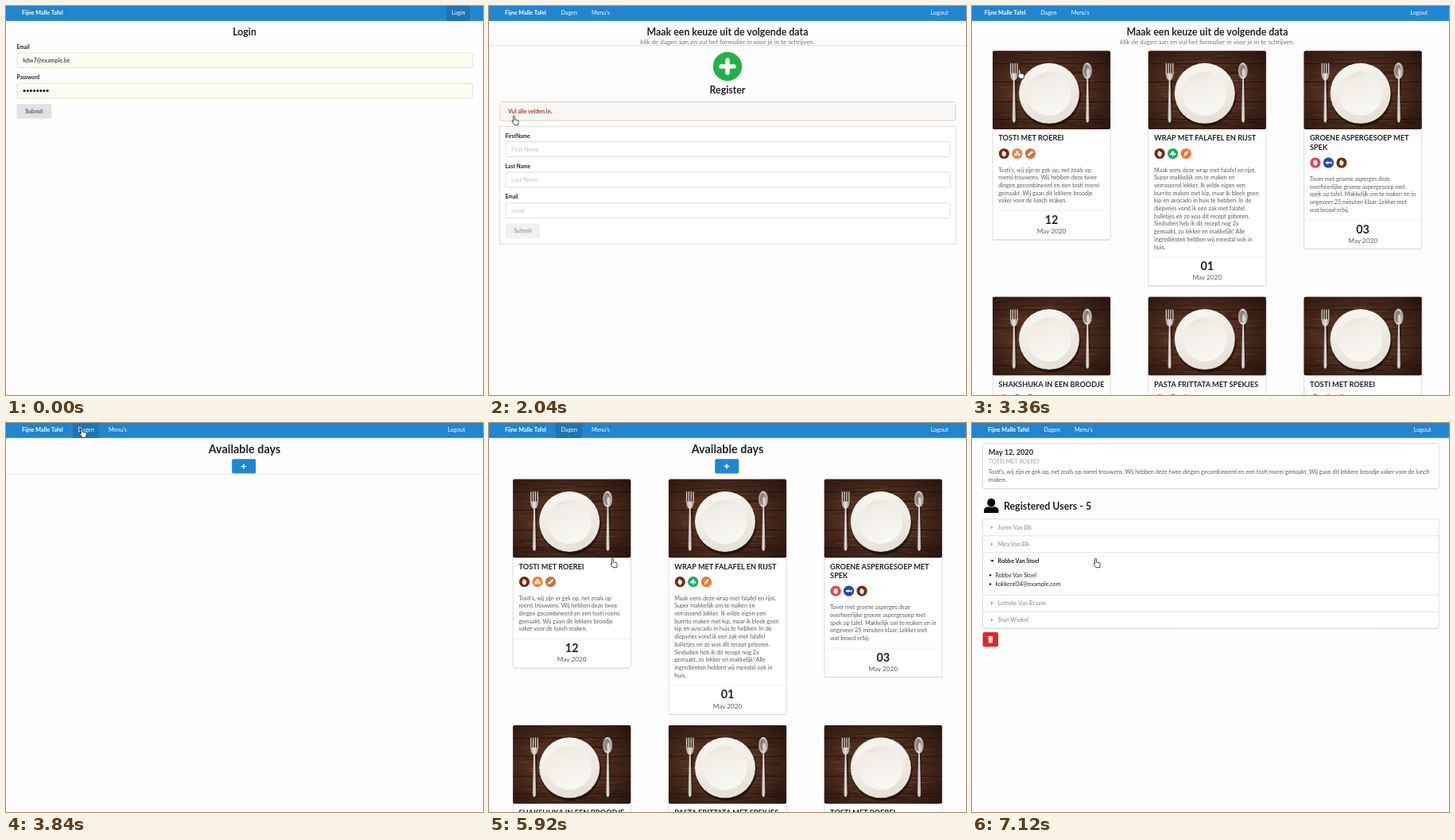
An HTML page that plays this animation: 600 px wide and 489 px high, repeating every 7.16 s.

```html
<!DOCTYPE html>
<html lang="nl">
<head>
<meta charset="utf-8">
<title>Lunch planner</title>
<style>
  html, body { margin: 0; width: 100%; height: 100%; overflow: hidden; background: #fefdfe; }
  svg { display: block; }
  text { font-family: Lato, sans-serif; fill: #222; white-space: pre; }
  .b { font-weight: 700; }
  .m { text-anchor: middle; }
  .w { fill: #fff; }
  .soft { fill: #777; }
  .body { fill: #5c5c5c; }
  .hint { fill: #c3c3c6; }
  .pale { fill: #a4a4a6; }
  .label { fill: #5f6062; }
  .warn { fill: #a83a2c; }
  .line { fill: none; stroke: #dcdce0; stroke-width: .8; }
  .box { fill: #fff; stroke: #d6d5da; stroke-width: .8; }
</style>
</head>
<body>
<svg id="stage" width="600" height="489" viewBox="0 0 600 489"></svg>
<script>
const LOOP = 7160;
const BLUE = '#2185d0';
const NAV_H = 18.8;

const text = (x, y, s, size = 7.2, cls = '') =>
  `<text x="${x}" y="${y}" font-size="${size}" class="${cls}">${s}</text>`;
const rect = (x, y, w, h, attrs = '') =>
  `<rect x="${x}" y="${y}" width="${w}" height="${h}" ${attrs}/>`;
const circle = (x, y, r, attrs = '') => `<circle cx="${x}" cy="${y}" r="${r}" ${attrs}/>`;
const ellipse = (x, y, rx, ry, attrs = '') => `<ellipse cx="${x}" cy="${y}" rx="${rx}" ry="${ry}" ${attrs}/>`;
const path = (d, attrs = '') => `<path d="${d}" ${attrs}/>`;
const place = (x, y, body) => `<g transform="translate(${x} ${y})">${body}</g>`;
const group = (id, body) => `<g id="${id}">${body}</g>`;
const rule = y => path(`M0 ${y}H600`, 'class="line"');
const plus = (x, y, r, w) =>
  path(`M${x - r} ${y}h${2 * r}M${x} ${y - r}v${2 * r}`, `stroke="#fff" stroke-width="${w}" stroke-linecap="round"`);
const panel = (x, y, w, h) => rect(x, y + .7, w, h, 'rx="2" fill="#d4d4d8"') + rect(x, y, w, h, 'rx="2" class="box"');

// Navigation; dx is the shift caused by the scrollbar
function nav({ dx = 0, loggedIn = true, tab = '' } = {}) {
  const dark = 'fill="#1c75b8"';
  let s = rect(0, 0, 600, NAV_H, `fill="${BLUE}"`);
  if (!loggedIn) s += rect(554, 0, 30, NAV_H, dark);
  if (tab) s += rect(84 + dx, 0, 33, NAV_H, `${dark} id="${tab}"`);
  s += text(20 + dx, 11.3, 'Fijne Malle Tafel', 7.2, 'b w');
  if (!loggedIn) return s + text(560.5, 11.3, 'Login', 7.2, 'w');
  return s + text(90.5 + dx, 11.3, 'Dagen', 7.2, 'w') + text(129 + dx, 11.3, "Menu's", 7.2, 'w')
    + text(555.8 + dx, 11.3, 'Logout', 7.2, 'w');
}

const intro = x => text(x, 36.5, 'Maak een keuze uit de volgende data', 12.35, 'b m')
  + text(x, 47.6, 'klik de dagen aan en vul het formulier in voor je in te schrijven.', 8.05, 'm soft');

function field(y, label, hint) {
  return text(20.6, y - 5, label, 6.7, 'b') + rect(21, y, 559, 19, 'rx="2" class="box"')
    + text(28.1, y + 12.2, hint, 7.2, 'hint');
}

function loginPage() {
  const input = y => rect(13.9, y, 573, 18.8, 'rx="2" fill="#fdfcf0" stroke="#dfdfbd" stroke-width=".8"');
  let dots = '';
  for (let i = 0; i < 8; i++) dots += circle(23.1 + i * 4.15, 106.5, 1.5, 'fill="#111"');
  return nav({ loggedIn: false }) + text(300, 36.5, 'Login', 12.35, 'b m')
    + text(13.5, 54, 'Email', 6.7, 'b') + input(58.8) + text(21.3, 71, 'kdw7@example.be')
    + text(13.5, 92.3, 'Password', 6.7, 'b') + input(97.2) + dots
    + rect(13.5, 123.3, 43.8, 18.2, 'id="submit" rx="2"')
    + text(35.4, 135, 'Submit', 7.2, 'b m label');
}

function registerPage() {
  return nav() + intro(300) + rule(49.5)
    + circle(300, 76, 18.2, 'fill="#25b04a"') + plus(300, 76, 8, 5.5)
    + text(300, 109.8, 'Register', 12.35, 'b m')
    + rect(13.9, 120.4, 573, 23.6, 'rx="2" fill="#f8f7f5" stroke="#dcc3ae" stroke-width=".8"')
    + text(24, 135, 'Vul alle velden in.', 7.2, 'b warn')
    + rect(13.4, 151.4, 573.8, 147.8, 'class="box"')
    + field(170.6, 'FirstName', 'First Name')
    + field(209, 'Last Name', 'Last Name')
    + field(247.3, 'Email', 'email')
    + rect(20.6, 273.6, 43.8, 18.3, 'rx="2" fill="#f0eff1"')
    + text(42.5, 285.3, 'Submit', 7.2, 'b m pale');
}

// Table setting: wooden planks, plate, fork and spoon
function photo() {
  let s = rect(0, 0, 148, 98.5, 'rx="2" fill="#52301f"');
  const rnd = i => { const v = Math.sin(i * 127.1 + 3) * 43758.5; return v - Math.floor(v); };
  for (let i = 0; i < 110; i++) {
    const w = 8 + rnd(i + 280) * 30, x = rnd(i) * (148 - w), y = 1 + rnd(i + 140) * 96;
    s += path(`M${x.toFixed(1)} ${y.toFixed(1)}h${w.toFixed(1)}`,
      `stroke="${i % 2 ? '#85573e' : '#22110b'}" stroke-width="1.1" opacity=".4"`);
  }
  for (const y of [16, 39, 64, 86]) s += path(`M0 ${y}H148`, 'stroke="#190b08" opacity=".7"');
  s += rect(0, 0, 148, 98.5, 'rx="2" fill="url(#vignette)"');

  const metal = 'fill="url(#metal)"';
  const handle = (x, top) => path(`M${x - .9} ${top}h1.8l1.3 ${86 - top}q-.4 4-2.2 4t-2.200-4z`, metal);
  const shadow = place(1.2, 1.2, path('M27 20v68M119 20v68', 'stroke="#0d0503" stroke-width="4" opacity=".4"'));
  return s + shadow
    + circle(72, 56, 38.8, 'fill="#120805" opacity=".55"') + circle(71, 53.3, 38, 'fill="url(#rim)"')
    + circle(71, 53.8, 27.5, 'fill="url(#plate)"')
    + path('M22.6 16v13M25.400 16v13M28.200 16v13M31 16v13', 'stroke="#d8d3cd" stroke-width="1.3" stroke-linecap="round"')
    + path('M22 28h9.600q.2 7-4 9h-1.600q-4.200-2-4-9z', metal) + handle(26.8, 36)
    + ellipse(119, 25, 6, 10.3, metal) + ellipse(118.4, 24.5, 3.8, 7.8, 'fill="#8d837c"')
    + ellipse(120, 27, 1.8, 5, 'fill="#d9d5d0"') + handle(119.3, 34);
}

const ICONS = {
  nut: ['#6b3016', 'M-.5-3.8l1 1.4Q3.4-1.5 2.5 1.2T0 4Q-3 2.6-2.7-.2T-.5-3.8'],
  soy: ['#ef8140', 'M-3.8 1.2a1.800 1.800 0 1 0 3.600 0 1.800 1.800 0 1 0-3.600 0M.3 1.2a1.800 1.800 0 1 0 3.600 0 1.800 1.800 0 1 0-3.600 0M-1.800-2a1.800 1.800 0 1 0 3.600 0 1.800 1.800 0 1 0-3.600 0'],
  peanut: ['#cf7039', 'M-3.5 2.5Q-4 0-1.2-.4L2-3.6Q4.3-3 3.4-.8L.8.8Q0 3.8-3.5 2.5'],
  leaf: ['#17ab68', 'M0-4L2.2-1Q4.2-.6 3.7 2L.6 1.5V4h-1.2V1.5L-3.7 2Q-4.2-.6-2.2-1Z'],
  wheat: ['#f87436', 'M-3 4L-1.8.4Q-2.5-1.4 0-2.2L2.6-4Q3.4-1.6 2 0L.2 2Z'],
  crab: ['#e0435a', 'M-1-4L0-2 1-4 2.6-1.5V2L0 4-2.6 2v-3.5Z'],
  fish: ['#2147a0', 'M-4.2 0Q-1.5-3 1.7-.5L4-2V2L1.7.5Q-1.5 3-4.2 0']
};

function card(x, y, title, icons, lines = [], day = '') {
  const drop = 11.5 * (title.length - 1);
  const h = 198.5 + drop + 9.7 * (lines.length - 1);
  let s = panel(0, 0, 148.2, h) + '<use href="#photo"/>';
  title.forEach((t, i) => s += text(7.3, 112.9 + i * 11.5, t, 9.2, 'b'));
  icons.forEach((name, i) => {
    const [color, d] = ICONS[name];
    s += place(14.3 + i * 16.5, 129 + drop,
      circle(0, 0, 6.6, `fill="${color}"`) + path(d, 'fill="#fff" opacity=".9"'));
  });
  lines.forEach((t, i) => s += text(7.2, 152 + drop + i * 9.7, t, 7.2, 'body'));
  if (day) s += path(`M.5 ${h - 36.5}h147.2`, 'class="line" opacity=".5"')
    + text(74, h - 19.8, day, 14.4, 'b m') + text(74, h - 7.6, 'May 2020', 8.22, 'm body');
  return place(x, y, s);
}

const TOSTI = ["Tosti's, wij zijn er gek op, net zoals op", 'roerei trouwens. Wij hebben deze twee',
  'dingen gecombineerd en een tosti roerei', 'gemaakt. Wij gaan dit lekkere broodje', 'vaker voor de lunch maken.'];
const WRAP = ['Maak eens deze wrap met falafel en rijst.', 'Super makkelijk om te maken en',
  'verrassend lekker. Ik wilde eigen een', 'burrito maken met kip, maar ik bleek geen', 'kip en avocado in huis te hebben. In de',
  'diepvries vond ik een zak met falafel', 'balletjes en zo was dit recept geboren.', 'Sindsdien heb ik dit recept nog 2x',
  'gemaakt, zo lekker en makkelijk! Alle', 'ingrediënten hebben wij meestal ook in', 'huis.'];
const SOUP = ['Tover met groene asperges deze', 'overheerlijke groene aspergesoep met', 'spek op tafel. Makkelijk om te maken en in',
  'ongeveer 25 minuten klaar. Lekker met', 'wat brood erbij.'];

const cards = () =>
  card(26, 56.5, ['TOSTI MET ROEREI'], ['nut', 'soy', 'peanut'], TOSTI, '12')
  + card(221.8, 56.5, ['WRAP MET FALAFEL EN RIJST'], ['nut', 'leaf', 'wheat'], WRAP, '01')
  + card(417.6, 56.5, ['GROENE ASPERGESOEP MET', 'SPEK'], ['crab', 'fish', 'nut'], SOUP, '03')
  + card(26, 365.8, ['SHAKSHUKA IN EEN BROODJE'], ['crab', 'fish', 'nut'])
  + card(221.8, 365.8, ['PASTA FRITTATA MET SPEKJES'], ['crab', 'nut', 'wheat'])
  + card(417.6, 365.8, ['TOSTI MET ROEREI'], ['nut', 'soy', 'peanut']);

const listPage = () => nav({ dx: -4.3, tab: 'hover' }) + intro(296) + cards();

const daysPage = () => nav({ tab: 'active' }) + text(300, 38.4, 'Available days', 14.4, 'b m')
  + rect(284.2, 45.3, 30, 18.3, `rx="2" fill="${BLUE}"`) + plus(299, 54.5, 2.5, 1.6)
  + group('empty', rule(64)) + group('loaded', place(4.2, 14.2, cards()));

function accordion(open) {
  const names = ['Joren Van Elk', 'Mira Van Elk', 'Robbe Van Stoel', 'Lotteke Van Braam', 'Stan Wiekel'];
  const extra = open ? 32.3 : 0;
  let s = panel(13.5, 120.8, 573.7, 105 + extra);
  names.forEach((name, i) => {
    const y = 120.8 + i * 21 + (i > 2 ? extra : 0), on = open && i === 2;
    if (i) s += path(`M13.5 ${y}h573.7`, 'class="line"');
    s += path(on ? `M23 ${y + 9.5}h5l-2.5 2.8z` : `M24 ${y + 8.2}l2.3 2.3-2.3 2.3z`, `fill="${on ? '#222' : '#999'}"`)
      + text(32.5, y + 13.1, name, 7.2, on ? 'b' : 'b pale');
  });
  if (open) [names[2], 'kokkerel34@example.com'].forEach((t, i) =>
    s += circle(23, 191.3 + i * 11.3, 1.3, 'fill="#222"') + text(29.5, 193.6 + i * 11.3, t));
  const trash = rect(0, 0, 19.5, 18.3, 'rx="2" fill="#db2828"')
    + path('M6.5 5.6h6.6v1.1H6.500zM8.500 4.800h2.600v1H8.500zM7 7.200h5.600l-.4 6.200H7.400z', 'fill="#fff"')
    + path('M8.7 8.2v4.2M10.9 8.2v4.2', 'stroke="#db2828" stroke-width=".5"');
  return s + place(13.5, 230.6 + extra, trash);
}

function detailPage() {
  return nav() + panel(13.5, 25.6, 573.7, 57)
    + text(20.7, 40.2, 'May 12, 2020', 9.2, 'b')
    + text(20.7, 50.6, 'TOSTI MET ROEREI', 7.2, 'pale')
    + text(20.7, 63.7, TOSTI.join(' ').replace(' maken.', ''), 7.2, 'body') + text(20.7, 73.8, 'maken.', 7.2, 'body')
    + ellipse(24.2, 100.2, 5, 5.5)
    + path('M15 113v-3q0-4 5.5-4.7 3.7 2 7.4 0 5.5.7 5.5 4.7v3z')
    + text(40, 108.7, 'Registered Users - 5', 12.35, 'b')
    + group('closed', accordion(false)) + group('open', accordion(true));
}

const PAGES = { login: loginPage, list: listPage, register: registerPage, days: daysPage, detail: detailPage };
const outline = 'fill="#fff" stroke="#222" stroke-width=".85" stroke-linejoin="round"';
const stop = (offset, color, opacity = 1) => `<stop offset="${offset}" stop-color="${color}" stop-opacity="${opacity}"/>`;

document.getElementById('stage').innerHTML = `<defs>
  <radialGradient id="vignette" cx=".45" cy=".5" r=".7">${stop(.4, '#1c0d08', 0) + stop(1, '#1c0d08', .75)}</radialGradient>
  <linearGradient id="rim" x2=".3" y2="1">${stop(0, '#faf8f3') + stop(1, '#e6e2d8')}</linearGradient>
  <linearGradient id="plate" x2=".3" y2="1">${stop(0, '#e3dfd5') + stop(.3, '#f1eee7') + stop(1, '#f8f6f1')}</linearGradient>
  <linearGradient id="metal">${stop(0, '#a59c95') + stop(.5, '#e6e2de') + stop(1, '#9c928b')}</linearGradient>
  ${group('photo', photo())}</defs>`
  + Object.entries(PAGES).map(([id, page]) => group(id, page())).join('')
  + group('cursor',
    path('M-1 7V1.2a1 1 0 0 1 2 0V4.8l3.6.8q1.3.3 1.2 1.7l-.5 2.2v2.2H.4L-2.4 7.7Q-3 6.3-1.9 6.2Z', outline + ' id="hand"')
    + path('M0 0V9.2L2.1 7.3 3.5 10.6 5 10 3.6 6.8H6.3Z', outline + ' id="arrow"'));

const SCENES = [[0, 'login'], [400, 'list'], [760, 'register'], [2200, 'list'], [3840, 'days'], [5960, 'detail']];
const MOVES = [[240, 31.5, 138], [3120, 31.5, 138], [3640, 95.5, 6.5], [4160, 95.5, 6.5],
  [4640, 188, 163], [5040, 155.5, 170], [LOOP, 155.5, 170]];

const el = id => document.getElementById(id);
const show = (id, on) => el(id).style.display = on ? '' : 'none';

function cursorAt(t) {
  const i = Math.max(1, MOVES.findIndex(m => m[0] > t));
  const [t0, x0, y0] = MOVES[i - 1], [t1, x1, y1] = MOVES[i];
  const p = Math.max(0, (t - t0) / (t1 - t0)), k = (1 - Math.cos(Math.PI * p)) / 2;
  return [x0 + (x1 - x0) * k, y0 + (y1 - y0) * k];
}

function draw(now) {
  const t = now % LOOP;
  const scene = SCENES.filter(s => s[0] <= t).pop()[1];
  for (const id in PAGES) show(id, id === scene);
  show('empty', t < 4080);
  show('loaded', t >= 4080);
  show('closed', t < 6840);
  show('open', t >= 6840);
  el('submit').setAttribute('fill', t < 240 ? '#e0e1e2' : '#cacbcd');

  const [x, y] = cursorAt(t);
  const arrow = (y > NAV_H && y < 56) || x > 179;
  show('cursor', t >= 240);
  show('arrow', arrow);
  show('hand', !arrow);
  show('hover', y < NAV_H && x > 80 && x < 113);
  el('cursor').setAttribute('transform', `translate(${x.toFixed(2)} ${y.toFixed(2)})`);
}

const start = performance.now();
function tick() {
  draw(performance.now() - start);
  requestAnimationFrame(tick);
}
tick();
</script>
</body>
</html>
```
